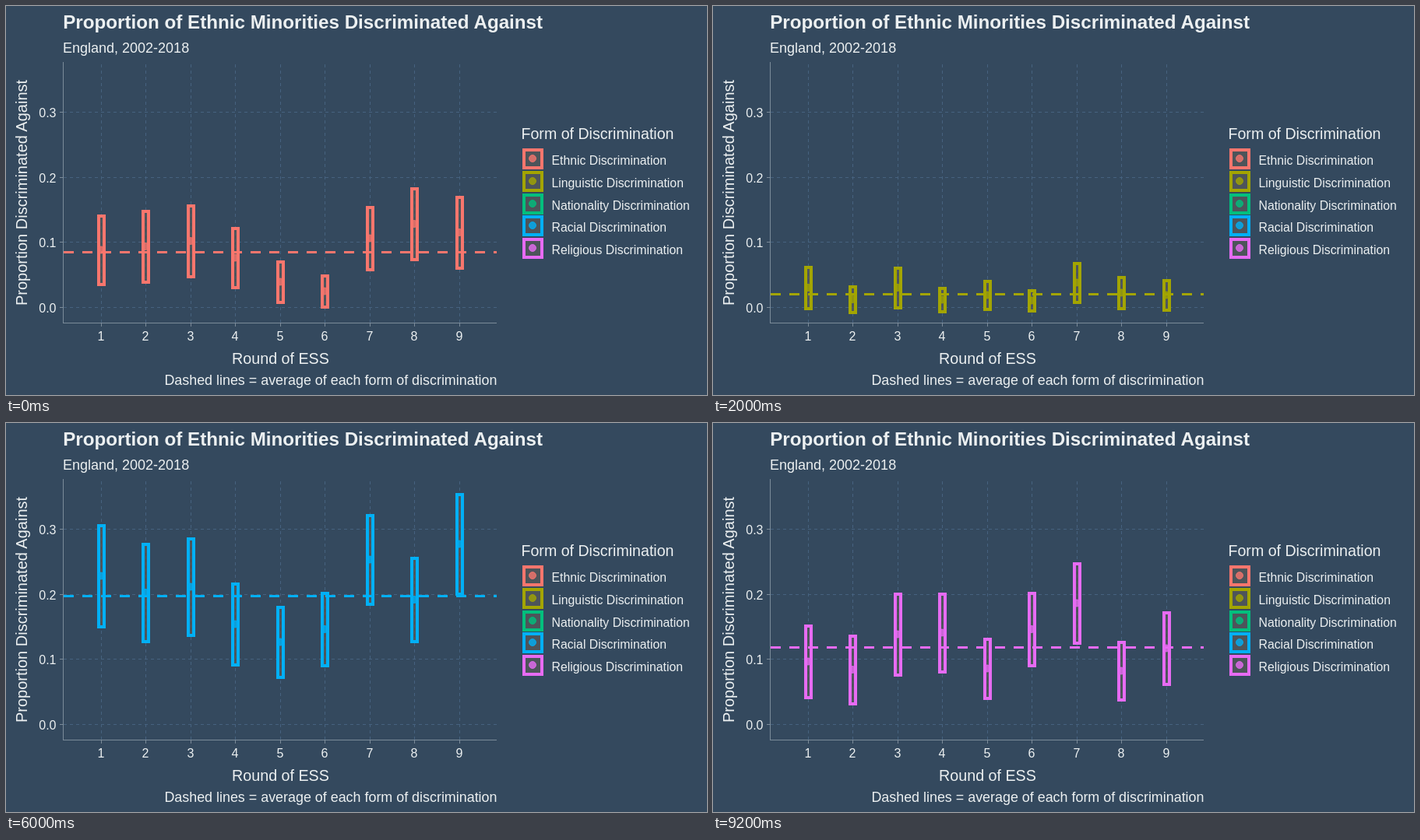
These frames come from a looping animation (900x500 px, 10 s). An HTML page:

```html
<!DOCTYPE html>
<html lang="en">
<head>
<meta charset="utf-8">
<title>Discrimination by round</title>
<style>
  html, body { margin: 0; width: 100%; height: 100%; overflow: hidden; background: #34495e; }
  svg { display: block; width: 900px; height: 500px; }
  text { font-family: "Liberation Sans", Arial, sans-serif; fill: #ecf0f1; }
</style>
</head>
<body>
<svg id="stage" viewBox="0 0 900 500"></svg>
<script>
const HOLD = 2000;
const ROUNDS = 9;
const LEFT = 74, RIGHT = 630, TOP = 72, BOTTOM = 407;
const STROKE = 4;

// Share discriminated against in each survey round, per thousand.
const forms = [
  { name: "Ethnic", color: "#F8766D", shares: [87, 93, 101, 75, 38, 24, 105, 127, 114] },
  { name: "Linguistic", color: "#A3A500", shares: [29, 11, 29, 11, 18, 10, 37, 22, 18] },
  { name: "Nationality", color: "#00BF7D", shares: [67, 61, 44, 113, 43, 53, 86, 87, 73] },
  { name: "Racial", color: "#00B0F6", shares: [227, 201, 210, 153, 125, 145, 252, 190, 276] },
  { name: "Religious", color: "#E76BF3", shares: [96, 83, 137, 140, 85, 145, 185, 81, 116] }
];

const stage = document.getElementById("stage");

const roundX = i => Math.floor(122 + 57.5 * i) + 0.5;
const valueY = p => Math.round(387 - 837 * p) + 0.5;
const mean = list => list.reduce((sum, v) => sum + v, 0) / list.length;

// Binomial confidence margin; sample size drifts slowly from round to round.
const margin = (p, i) =>
  Math.sqrt(p * (1 - p)) * (0.172 + 0.0155 * Math.cos((i - 0.5) * Math.PI / 5));

function add(parent, tag, attrs, content) {
  const node = document.createElementNS("http://www.w3.org/2000/svg", tag);
  for (const key in attrs) node.setAttribute(key, attrs[key]);
  if (content) node.textContent = content;
  return parent.appendChild(node);
}

const label = (content, x, y, size, attrs = {}) =>
  add(stage, "text", { x, y, "font-size": size, ...attrs }, content);

const line = (parent, x1, y1, x2, y2, stroke, width = 1, dash = "none") =>
  add(parent, "line", { x1, y1, x2, y2, stroke, "stroke-width": width, "stroke-dasharray": dash });

// Outlined box with a translucent dot; y1 and y2 run along the middle of the outline.
function box(parent, cx, y1, y2, width, color) {
  add(parent, "rect", {
    x: cx - width / 2, y: y1, width, height: y2 - y1,
    fill: "#595959", "fill-opacity": 0.7, stroke: color, "stroke-width": STROKE
  });
  add(parent, "circle", {
    cx: cx - 0.5, cy: (y1 + y2) / 2 - 0.5, r: 4.5,
    fill: color, stroke: color, "fill-opacity": 0.8, "stroke-opacity": 0.8
  });
}

function drawFrame() {
  const grid = "#46627f", axis = "#7b8b99";
  const middle = { "text-anchor": "middle" }, end = { "text-anchor": "end" };

  for (let i = 0; i < 4; i++) {
    const y = valueY(i / 10);
    line(stage, LEFT, y, RIGHT, y, grid, 1, "4 4");
    line(stage, LEFT - 5, y, LEFT, y, axis);
    label((i / 10).toFixed(1), 64.5, y + 6, 16, end);
  }
  for (let i = 0; i < ROUNDS; i++) {
    const x = roundX(i);
    line(stage, x, BOTTOM, x, TOP, grid, 1, "4 4");
    line(stage, x, BOTTOM, x, BOTTOM + 5, axis);
    label(i + 1, x - 0.5, 430, 16, middle);
  }
  line(stage, LEFT - 0.5, TOP, LEFT - 0.5, BOTTOM + 1, axis);
  line(stage, LEFT - 1, BOTTOM + 0.5, RIGHT, BOTTOM + 0.5, axis);

  label("Proportion of Ethnic Minorities Discriminated Against", 73.2, 29, 24.2, { "font-weight": "bold" });
  label("England, 2002-2018", 73, 60, 18);
  label("Round of ESS", 352.5, 460, 19.7, middle);
  label("Dashed lines = average of each form of discrimination", 630.5, 487, 17.9, end);
  label("Proportion Discriminated Against", 0, 0, 20, { ...middle, transform: "translate(27 240) rotate(-90)" });

  label("Form of Discrimination", 661.5, 171, 19.6);
  forms.forEach((form, i) => {
    const y = 196.5 + Math.round(28.8 * i);
    box(stage, 676.5, y - 11.5, y + 11.5, 23, form.color);
    label(`${form.name} Discrimination`, 700.5, y + 7.5, 15.8);
  });
}

function drawSeries({ color, shares }) {
  const group = add(stage, "g", { visibility: "hidden" });
  const values = shares.map(s => s / 1000);
  values.forEach((p, i) => {
    const half = margin(p, i);
    box(group, roundX(i), valueY(p + half) - 0.5, valueY(p - half) - 0.5, 7, color);
  });
  const y = valueY(mean(values));
  line(group, LEFT, y, RIGHT, y, color, 3, "13 11");
  return group;
}

drawFrame();
const series = forms.map(drawSeries);

function render(time) {
  const current = Math.floor(time / HOLD) % series.length;
  series.forEach((group, i) => group.setAttribute("visibility", i === current ? "visible" : "hidden"));
}

function tick() {
  render(performance.now());
  requestAnimationFrame(tick);
}
tick();
</script>
</body>
</html>
```
